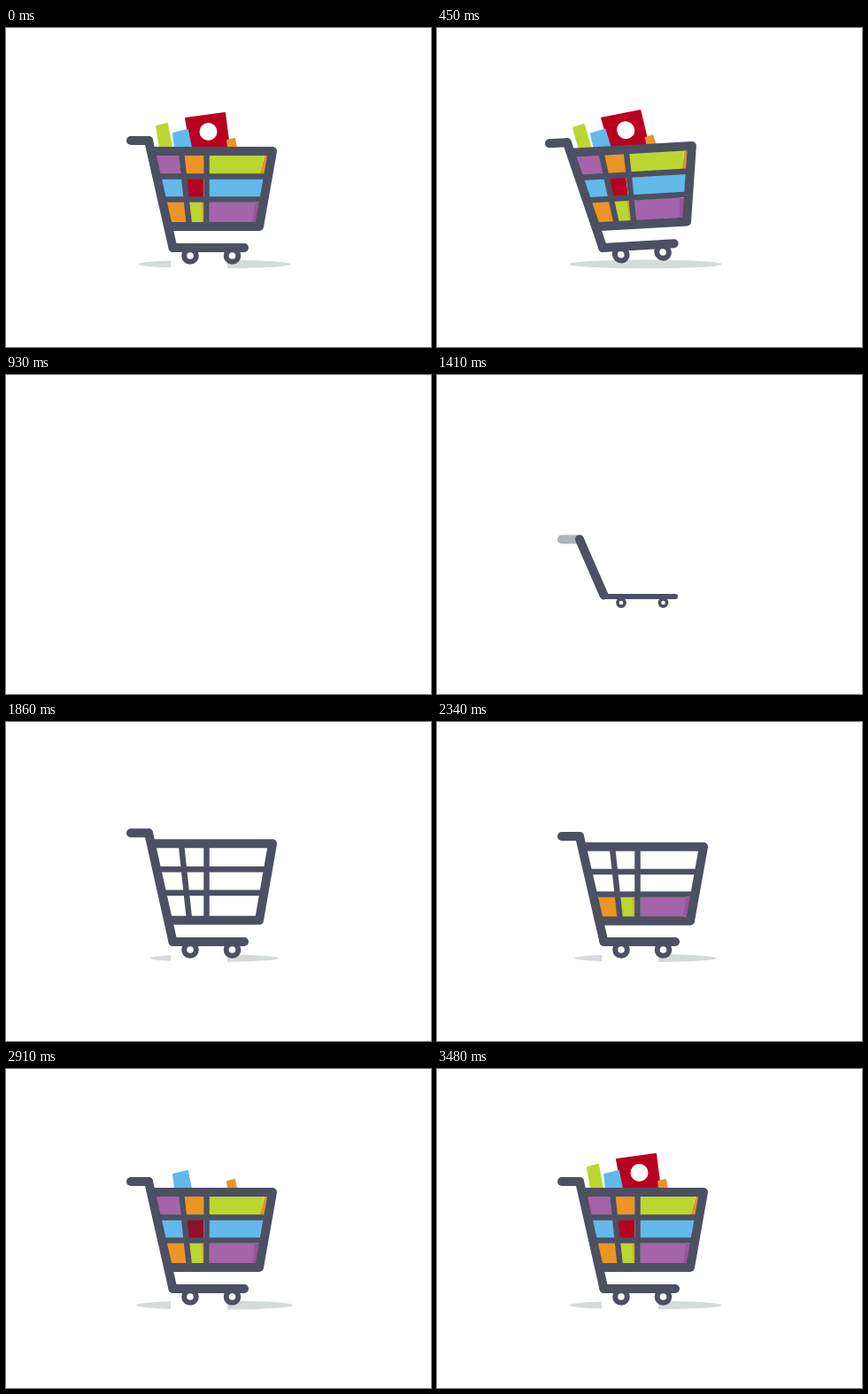
Animation of 480 by 360 pixels, one loop 3.51 s. Source, as an HTML page:

```html
<!DOCTYPE html>
<html lang="en">
<head>
<meta charset="utf-8">
<title>Shopping cart</title>
<style>
  html, body { margin: 0; width: 100%; height: 100%; overflow: hidden; background: #fff; }
  svg { display: block; }
  .line { fill: none; stroke: #4c5062; stroke-width: 10; stroke-linecap: round; stroke-linejoin: round; }
  .line path { vector-effect: non-scaling-stroke; }
  .thin { stroke-width: 6.5; stroke-linecap: butt; }
  .soft { stroke-width: 2; stroke-linejoin: round; }
  .purple { fill: #a564a9; stroke: #a564a9; }
  .orange { fill: #ec9424; stroke: #ec9424; }
  .lime { fill: #bcd631; stroke: #bcd631; }
  .blue { fill: #62b9ea; stroke: #62b9ea; }
  .red { fill: #b80020; stroke: #b80020; }
</style>
</head>
<body>
<svg width="480" height="360" viewBox="0 0 480 360">
  <defs>
    <filter id="blur" filterUnits="userSpaceOnUse" x="-60" y="0" width="700" height="360" color-interpolation-filters="sRGB">
      <feGaussianBlur id="blurAmount" stdDeviation="0 0"/>
    </filter>
    <clipPath id="fill"><rect id="level" x="130" width="200" height="300"/></clipPath>
  </defs>

  <g id="shadow"><ellipse rx="86" ry="5" fill="#d5dbdb"/></g>
  <rect id="gap" x="186" y="256" width="64" height="20" fill="#fff"/>

  <g id="blurred"><g id="cart">
    <g id="upper">
      <g id="late" class="soft">
        <path class="lime" d="M170 111l12-3 5 27h-13z"/>
        <path class="red" d="M203 102l44-6 5 39h-43z"/>
        <circle cx="228.500" cy="117" r="10" fill="#fff"/>
      </g>
      <g clip-path="url(#fill)">
        <g class="soft">
          <path class="blue" d="M189 119l16-4 4 20h-18z"/>
          <path class="orange" d="M250 127l8-2 2 10h-9z"/>
        </g>
        <path class="purple" d="M168 144h27l2 21h-24z"/>
        <path class="orange" d="M201 144h22v21h-20z"/>
        <path class="lime" d="M229 144h62l-4 21h-58z"/>
        <path fill="#db962b" d="M292 144h6l-4 21h-7z"/>
        <path class="blue" d="M174 170h24l2 21h-22z"/>
        <path id="redCell" d="M204 170h19v21h-17z"/>
        <path class="blue" d="M229 170h63l-4 21h-59z"/>
        <path class="orange" d="M180 197h22l2 22h-19z"/>
        <path class="lime" d="M208 197h13l2 22h-13z"/>
        <path fill="#cba42e" d="M221 197h3v22h-2z"/>
        <path class="purple" d="M230 197h51l-3 22h-48z"/>
        <path fill="#95559a" d="M281 197h7l-4 22h-6z"/>
      </g>
      <g class="line">
        <g id="basket">
          <path d="M165 139H301L286 224H184"/>
          <g class="thin">
            <path d="M170 167.500H296M176 193.500H291M198 140L207 223M226.500 140V223"/>
          </g>
        </g>
        <path d="M161 127L188.500 248"/>
        <path id="handle" d="M141 127H161"/>
      </g>
    </g>
    <g class="line"><path id="bar" d=""/></g>
    <g id="wheelA"><circle r="6.800" fill="#fff" stroke="#4c5062" stroke-width="6"/></g>
    <g id="wheelB"><circle r="6.800" fill="#fff" stroke="#4c5062" stroke-width="6"/></g>
  </g></g>
</svg>
<script>
const LOOP = 3510, STEP = 30;
const el = Object.fromEntries([...document.querySelectorAll('[id]')].map(e => [e.id, e]));
const set = (id, name, value) => el[id].setAttribute(name, value);
const progress = (t, from, to) => Math.min(1, Math.max(0, (t - from) / (to - from)));

// Smooth interpolation through [time, value] keys.
function track(t, keys) {
  if (t <= keys[0][0]) return keys[0][1];
  for (let i = 1; i < keys.length; i++) {
    const [t0, v0] = keys[i - 1], [t1, v1] = keys[i];
    if (t <= t1) {
      const u = progress(t, t0, t1);
      return v0 + (v1 - v0) * u * u * (3 - 2 * u);
    }
  }
  return keys[keys.length - 1][1];
}

const stretchKeys = [[1290, .05], [1560, 1.18], [1740, .93], [1950, 1.07], [2160, .96],
  [2250, .97], [2340, .983], [2550, 1.015], [2760, .995], [2910, 1]];
const shadowKeys = [[1430, 0], [1640, 1.39], [1860, .85], [2080, 1.12], [2340, .935],
  [2660, 1.04], [2780, 1.02], [2910, 1.03], [3200, .99], [3420, 1]];
const basketKeys = [[1420, 0], [1600, 1.08], [1710, .97], [1800, 1]];
const wheelKeys = [[1290, 0], [1410, .6], [1540, 1.15], [1680, 1]];
const levelKeys = [[1830, 222], [2310, 195], [2370, 195], [2850, 108]];
const lateKeys = [[2910, 42], [3210, -2], [3420, 0]];

function leave(t) {
  const pull = progress(t, 30, 540) ** 3;
  const go = progress(t, 600, 930);
  const x = -2 * pull + 385 * go ** 2.2;
  const angle = -6 * pull - track(t, [[540, 0], [780, 7]]);
  const lean = 5 * pull + track(t, [[540, 0], [610, 1.5], [780, -8.5]]);
  set('cart', 'transform', `translate(${188 + x} 249) rotate(${angle}) skewX(${lean}) translate(-188 -249)`);
  set('blurAmount', 'stdDeviation', `${12 * go} ${0.8 * go}`);
  if (go > 0) set('blurred', 'filter', 'url(#blur)');
  else el.blurred.removeAttribute('filter');
  return 370 * go ** 2.8;
}

function draw(t) {
  const blank = t >= 930 && t < 1290;
  el.blurred.style.display = el.shadow.style.display = blank ? 'none' : '';
  if (blank) return;

  const building = t >= 1290;
  const clock = building ? t : LOOP;
  const shadowX = leave(building ? 0 : t);
  const size = track(clock, shadowKeys);
  set('shadow', 'transform', `translate(${235.5 + shadowX} 266.5) scale(${size})`);
  el.gap.style.display = building || t < 30 ? '' : 'none';

  set('upper', 'transform', `translate(0 249) scale(1 ${track(clock, stretchKeys)}) translate(0 -249)`);
  const width = track(clock, basketKeys);
  set('basket', 'transform', `translate(162 0) scale(${width} 1) translate(-162 0)`);
  el.basket.style.display = width > 0 ? '' : 'none';
  el.handle.style.opacity = track(clock, [[1310, 0], [1530, 1]]);

  const thickness = track(clock, [[1290, 4], [1410, 6], [1560, 10]]);
  set('bar', 'd', `M188.500 ${253 - thickness / 2}H${track(clock, [[1290, 189], [1390, 269]])}`);
  el.bar.style.strokeWidth = thickness;
  const wheel = track(clock, wheelKeys);
  set('wheelA', 'transform', `translate(208 257) scale(${wheel})`);
  set('wheelB', 'transform', `translate(255.500 257) scale(${wheel})`);

  set('level', 'y', track(clock, levelKeys));
  set('late', 'transform', `translate(0 ${track(clock, lateKeys)})`);
  el.late.style.display = clock > 2910 ? '' : 'none';
  const glow = track(clock, [[2880, 0], [3150, 1]]);
  set('redCell', 'fill', `rgb(${144 + 40 * glow},${16 - 16 * glow},${40 - 8 * glow})`);
}

const start = performance.now();
function frame() {
  const t = (performance.now() - start) % LOOP;
  draw(Math.floor(t / STEP) * STEP);
  requestAnimationFrame(frame);
}
frame();
</script>
</body>
</html>
```
